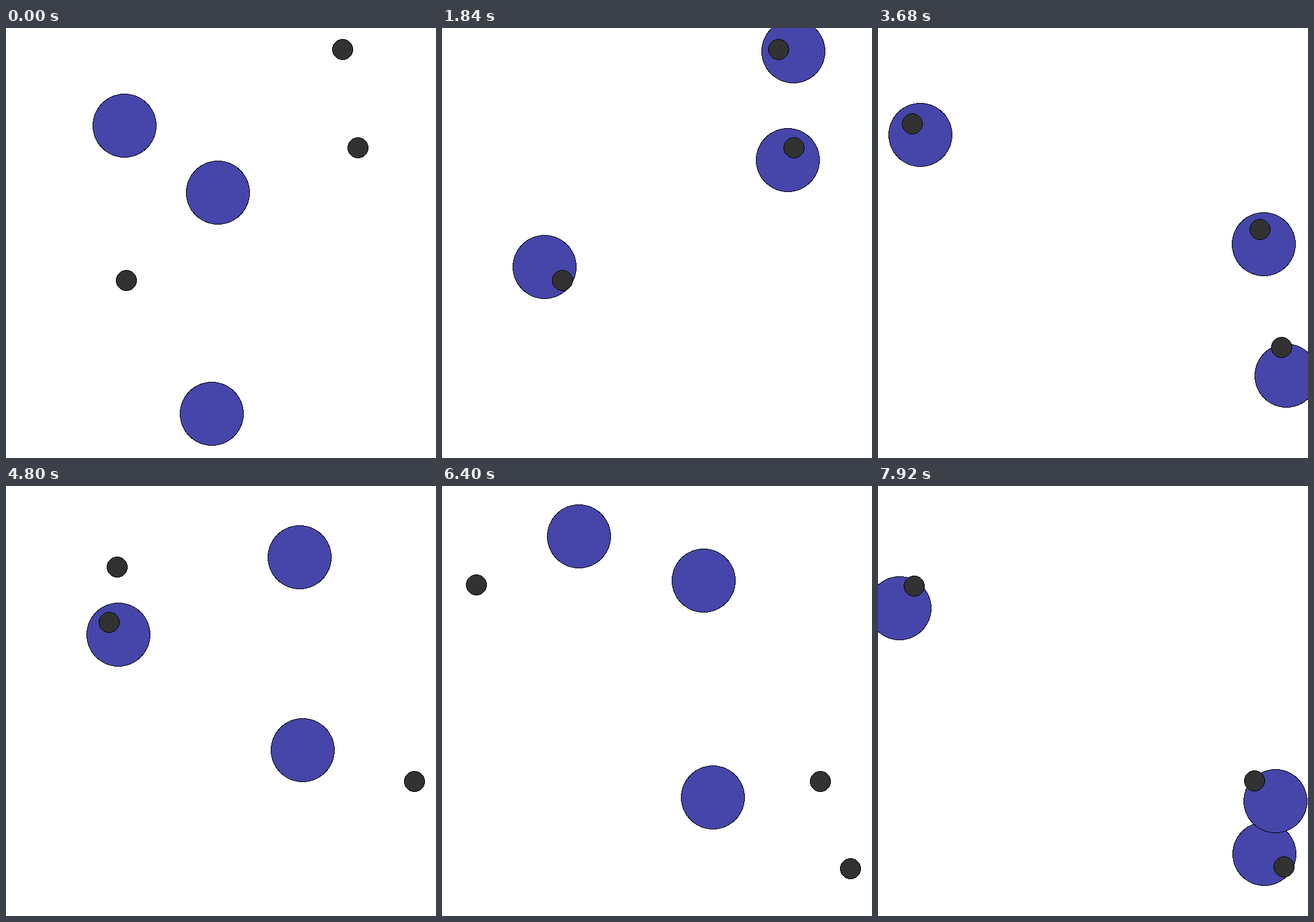
An HTML page for the animation above (8000 ms loop, 700 px wide and 700 px high).

```html
<!DOCTYPE html>
<html lang="en">
<head>
<meta charset="utf-8">
<title>Agents covering landmarks</title>
<style>
  html, body { margin: 0; height: 100%; overflow: hidden; background: #fff; }
  svg { display: block; shape-rendering: crispEdges; }
</style>
</head>
<body>
<svg id="stage" width="700" height="700" viewBox="0 0 700 700"></svg>
<script>
const STEP = 80, FRAMES = 100, EPISODE = 26, MID = 350, REACH = 315;

// Each agent runs through its stops, reached at the episode's times (in steps).
const episodes = [
  {
    times: [0, 23],
    marks: [[548, 35], [573, 195], [196, 411]],
    agents: [[[193, 159], [167, 389]], [[345, 268], [572, 38]], [[335, 628], [563, 215]]]
  },
  {
    times: [0, 20],
    marks: [[56, 156], [622, 328], [657, 520]],
    agents: [[[390, 320], [69, 174]], [[430, 250], [628, 352]], [[682, 604], [665, 566]]]
  },
  {
    times: [0, 8, 20],
    marks: [[181, 132], [168, 222], [665, 481]],
    agents: [
      [[330, 300], [183, 242], [178, 240]],
      [[620, 48], [478, 116], [162, 128]],
      [[350, 250], [483, 430], [633, 500]]
    ]
  },
  {
    times: [0, 9, 21],
    marks: [[55.5, 160.5], [616, 481.4], [665, 623]],
    agents: [
      [[250, 67], [35, 184], [31, 197]],
      [[420, 500], [589, 557], [633, 602]],
      [[400, 120], [608, 387], [651, 515]]
    ]
  }
];

const smooth = u => u * u * (3 - 2 * u);
// Rushes past the goal at half time, then drifts back onto it.
const settle = u => 1 - (1 - u) ** 2 * Math.cos(Math.PI * u);

function place(stops, times, step) {
  let leg = 0;
  while (leg < times.length - 2 && step >= times[leg + 1]) leg++;
  const u = Math.min(1, (step - times[leg]) / (times[leg + 1] - times[leg]));
  const k = leg === times.length - 2 ? settle(u) : smooth(u);
  return stops[leg].map((v, axis) => v + (stops[leg + 1][axis] - v) * k);
}

// A disc is a black circle with a coloured one, a pixel smaller, on top.
function disc(r, color) {
  const layers = [[r, '#000'], [r - 1, color]].map(([radius, fill]) => {
    const c = document.createElementNS('http://www.w3.org/2000/svg', 'circle');
    c.setAttribute('r', radius);
    c.setAttribute('fill', fill);
    document.getElementById('stage').append(c);
    return c;
  });
  return (x, y) => layers.forEach(c => {
    c.setAttribute('cx', x);
    c.setAttribute('cy', y);
  });
}

const discs = [...Array(6).keys()].map(i => i < 3 ? disc(52, '#4646aa') : disc(17, '#323232'));

function draw(frame) {
  const { times, marks, agents } = episodes[Math.floor(frame / EPISODE)];
  const items = [...agents.map(stops => place(stops, times, frame % EPISODE)), ...marks];
  // The view zooms so that the farthest item sits at a fixed distance from the middle.
  const far = Math.max(...items.flat().map(v => Math.abs(v - MID)));
  const fit = v => Math.round(MID + (v - MID) * REACH / far);
  items.forEach(([x, y], i) => discs[i](fit(x), fit(y)));
}

function tick() {
  draw(Math.floor(performance.now() / STEP) % FRAMES);
  requestAnimationFrame(tick);
}
tick();
</script>
</body>
</html>
```
